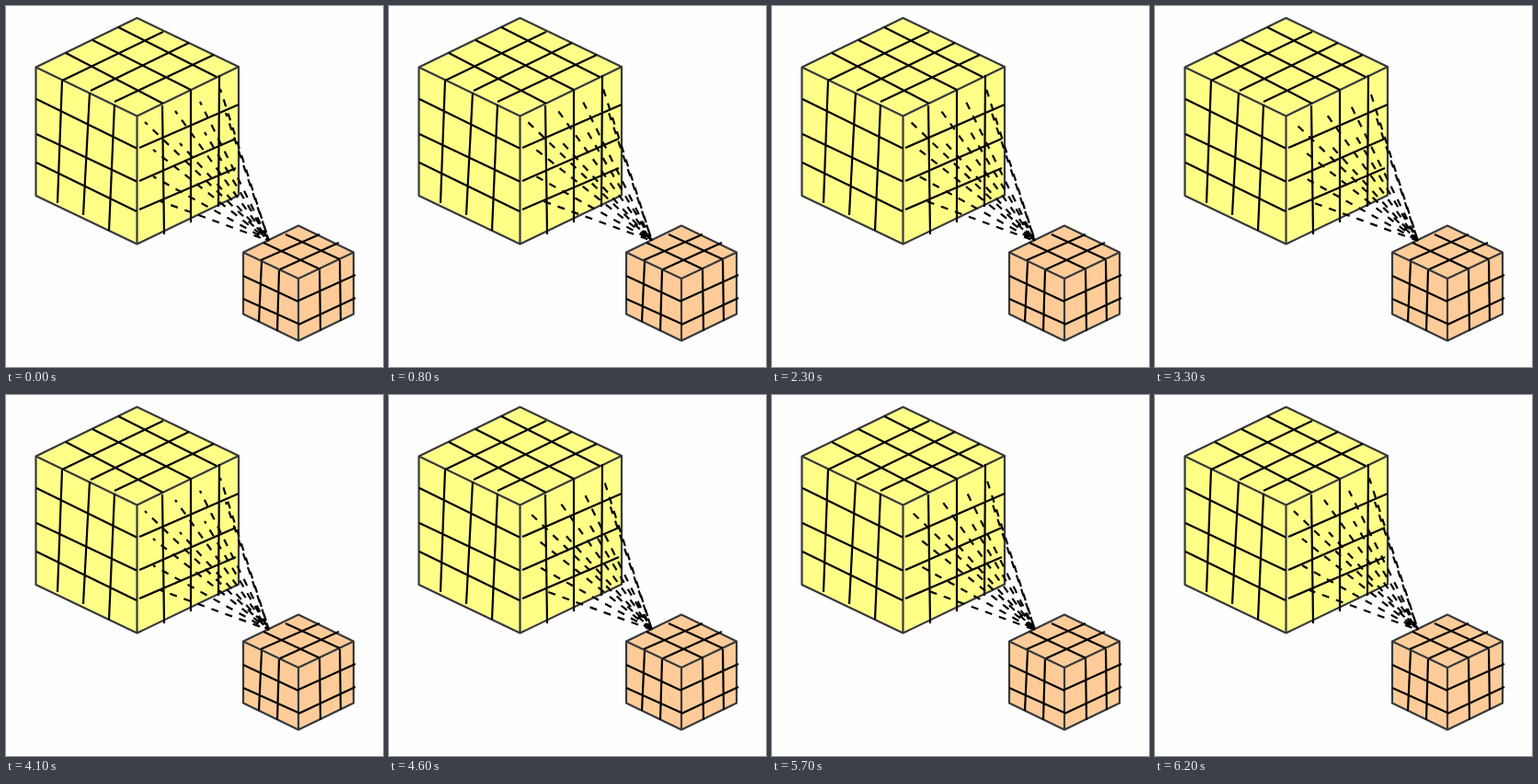
An HTML page that plays this animation: 410x392 px, repeating every 6300 ms.

```html
<!DOCTYPE html>
<html lang="en">
<head>
<meta charset="utf-8">
<title>Cube kernel</title>
<style>
  html, body {
    margin: 0;
    width: 100%;
    height: 100%;
    overflow: hidden;
    background: #fefefe;
  }
  svg { display: block; }
  path { stroke-width: 2.2; stroke-linejoin: round; fill: none; }
  .big, .small { stroke: #36393d; }
  .big { fill: #ffff88; }
  .small { fill: #ffcc99; }
  .edge { fill: none; }
  .grid, .rays { stroke: #000; }
  .rays {
    stroke-dasharray: 8 8;
    animation: flow 6300ms steps(63, end) infinite;
  }
  /* 63 steps of 8.56 px along every ray */
  @keyframes flow {
    from { stroke-dashoffset: 4px; }
    to { stroke-dashoffset: -535.28px; }
  }
</style>
</head>
<body>
<svg width="410" height="392" viewBox="0 0 410 392">
  <path class="big" d="M142.500 13L253 66V205.500L142.500 258.500L32.500 206V66.500Z"/>
  <path class="big edge" d="M32.500 66.500L142.500 119.500L253 66M142.500 119.500V258.500"/>
  <path class="grid" d="
    M61 81L171 28M92 92L199 40M118 104L226 53
    M122 23L229 77M94 37L201 91M65 51L171 106
    M61 81L56 214M91 94L84 227M118 107L112 244
    M33 101L142 154.500M33 139L142 190.500M33 170L142 223
    M170 108L172 248M201 91V235M232 75L231 218
    M145 154L253 107M145 190L250 144M145 221L250 176"/>
  <path class="small" d="M318 238.500L378 267.500V334.500L318 363.500L258 334.500V267.500Z"/>
  <path class="small edge" d="M258 267.500L318 296L378 267.500M318 296V363.500"/>
  <path class="grid" d="
    M277 276L341 248M298 286L362 257
    M304 248L363 275M280 257L342 286
    M278 278L275 343M297 287L295 353
    M258 293L318 321M258 318L318 345
    M341 287L342 353M363 276L364 342
    M318 320L380 292M318 346L380 317"/>
  <path class="rays" d="
    M151 126L286 255M184 114L286 255M211 104L286 255M233 90L286 255
    M160 156L286 255M189 149L286 255M216 137L286 255M239 116L286 255
    M160 185L286 255M168 212L286 255"/>
</svg>
</body>
</html>
```
